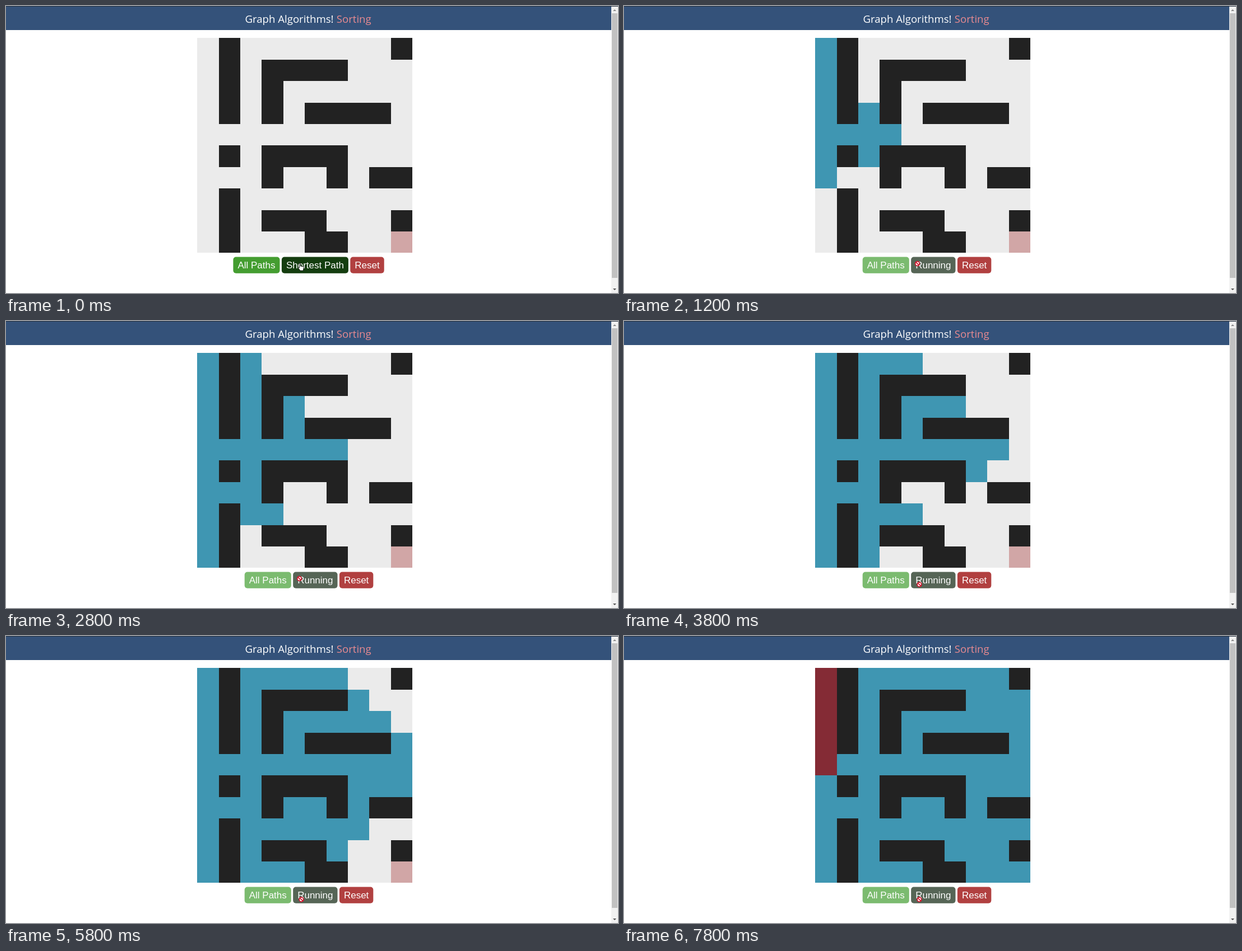
Animation, 1092 px wide and 513 px high, one loop 8000 ms. Source, as an HTML page with a canvas:

```html
<!DOCTYPE html>
<html lang="en">
<head>
<meta charset="utf-8">
<title>Graph Algorithms</title>
<style>
  html, body { margin: 0; width: 100%; height: 100%; overflow: hidden; background: #fff; }
  canvas { display: block; }
</style>
</head>
<body>
<canvas id="stage" width="1092" height="513"></canvas>
<script>
const ctx = document.getElementById('stage').getContext('2d');
const LOOP = 8000, TICK = 200, VISIT_MS = 107, PATH_START = 6990;
const COLORS = { open: '#ebebeb', wall: '#222', goal: '#d1a6a6', seen: '#3f96b2', path: '#842b35' };
const MAZE = [
  '.#.......#',
  '.#.####...',
  '.#.#......',
  '.#.#.####.',
  '..........',
  '.#.####...',
  '...#..#.##',
  '.#........',
  '.#.###...#',
  '.#...##...'
];

// Breadth-first order of all open cells: up, right, down, left.
function searchOrder() {
  const queue = [[0, 0]], known = new Set(['0,0']);
  for (const [r, c] of queue) {
    for (const [dr, dc] of [[-1, 0], [0, 1], [1, 0], [0, -1]]) {
      const next = [r + dr, c + dc];
      if (MAZE[next[0]]?.[next[1]] !== '.' || known.has(String(next))) continue;
      known.add(String(next));
      queue.push(next);
    }
  }
  return queue;
}
const order = searchOrder();

function rect(x, y, w, h, color) {
  ctx.fillStyle = color;
  ctx.fillRect(x, y, w, h);
}

function text(str, x, y, font, color) {
  ctx.font = font;
  ctx.fillStyle = color;
  ctx.fillText(str, x, y);
}

function cell(r, c, color) {
  const x = i => Math.round(341.2 + 38.4 * i), y = i => Math.round(57.4 + 38.4 * i);
  rect(x(c), y(r), x(c + 1) - x(c), y(r + 1) - y(r), color);
}

function polygon(points, color) {
  ctx.beginPath();
  points.forEach(([x, y]) => ctx.lineTo(x, y));
  ctx.closePath();
  ctx.fillStyle = color;
  ctx.fill();
}

function drawPage() {
  rect(0, 0, 1092, 513, '#fff');
  rect(0, 0, 1080, 43, '#34527a');
  const font = '18.6px "Open Sans", "Noto Sans", sans-serif';
  text('Graph Algorithms!', 426.5, 30, font, '#fff');
  text('Sorting', 589.8, 30, font, '#e88a90');
  rect(1080, 0, 12, 513, '#f1f1f1');
  rect(1081, 13, 10, 473, '#c1c1c1');
  polygon([[1083, 9], [1086, 6], [1089, 9]], '#888');
  polygon([[1083, 505], [1086, 508], [1089, 505]], '#505050');
  rect(0, 0, 1092, 1, '#25303f');
}

function drawMaze(t) {
  const visited = t ? Math.floor(1.68 + t / VISIT_MS) : 0;
  const traced = Math.floor((t - PATH_START) / TICK) + 1;
  MAZE.forEach((row, r) => [...row].forEach((ch, c) =>
    cell(r, c, ch === '#' ? COLORS.wall : COLORS.open)));
  cell(9, 9, COLORS.goal);
  order.slice(0, visited).forEach(([r, c]) => cell(r, c, COLORS.seen));
  for (let r = 0; r < traced; r++) cell(r, 0, COLORS.path);
}

function drawButtons(x, buttons) {
  for (const [label, color] of buttons) {
    ctx.font = '17px "Liberation Sans", Arial, sans-serif';
    const width = ctx.measureText(label).width + 16;
    ctx.fillStyle = color;
    ctx.beginPath();
    ctx.roundRect(x, 448.6, width, 29.2, 5);
    ctx.fill();
    text(label, x + 8, 468.8, ctx.font, '#fff');
    x += width + 3.4;
  }
}

function drawHand(x, y) {
  const hand = new Path2D('M2.2 1Q3.4 0 4.2 1V5.4L9 6.4Q10 6.8 9.8 8L8.8 13.5H3.4L.2 9Q0 7.5 1.4 7.8L2.2 8.5Z');
  ctx.save();
  ctx.translate(x, y);
  ctx.fillStyle = '#fff';
  ctx.strokeStyle = '#111';
  ctx.lineWidth = 0.9;
  ctx.fill(hand);
  ctx.stroke(hand);
  ctx.restore();
}

function drawForbidden(x, y) {
  ctx.beginPath();
  ctx.arc(x, y, 3.8, 0, 7);
  ctx.fillStyle = '#fff';
  ctx.fill();
  ctx.moveTo(x - 2.7, y - 2.7);
  ctx.lineTo(x + 2.7, y + 2.7);
  ctx.strokeStyle = '#d3122a';
  ctx.lineWidth = 1.7;
  ctx.stroke();
}

function draw(t) {
  drawPage();
  drawMaze(t);
  if (t === 0) {
    drawButtons(405.4, [['All Paths', '#449d30'], ['Shortest Path', '#143d0f'], ['Reset', '#b14040']]);
    drawHand(521.5, 459.5);
  } else {
    drawButtons(425.7, [['All Paths', '#7bbb6f'], ['Running', '#566556'], ['Reset', '#b14040']]);
    if (t < 3200) drawForbidden(523.5, 460.5);
    else drawForbidden(527, 471);
  }
}

function frame() {
  const t = performance.now() % LOOP;
  draw(Math.floor(t / TICK) * TICK);
  requestAnimationFrame(frame);
}
frame();
</script>
</body>
</html>
```
